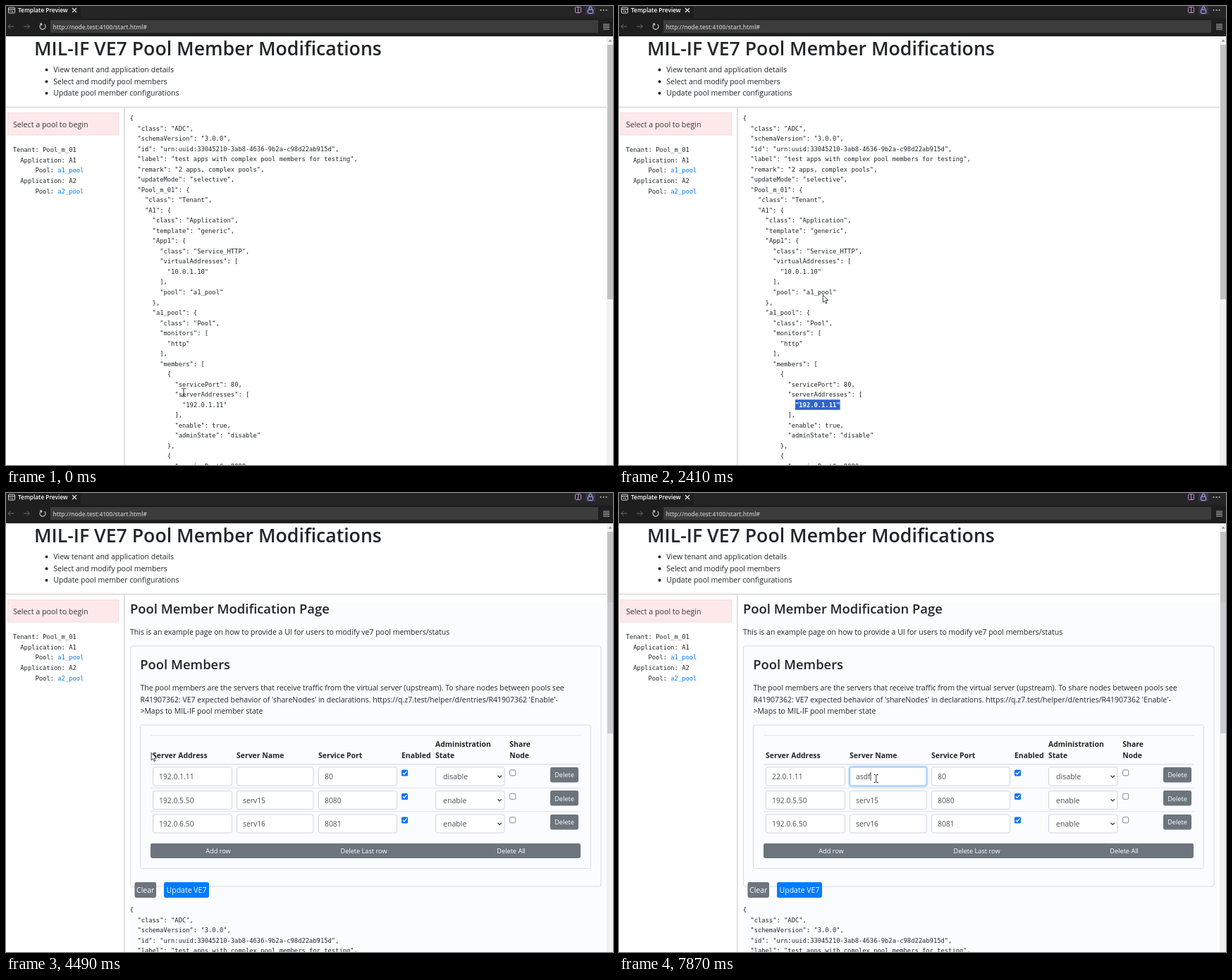
Write an HTML page that moves like this. It is 861x651 px and loops after 8000 ms.

```html
<!DOCTYPE html>
<html lang="en">
<head>
<meta charset="utf-8">
<title>Template Preview</title>
<style>
html, body { margin: 0; width: 100%; height: 100%; overflow: hidden; background: #fff; }
svg { display: block; width: 861px; height: 651px; overflow: hidden; }
text { font-family: "Open Sans", "Noto Sans", sans-serif; white-space: pre; }
text.mono { font-family: "DejaVu Sans Mono", "Liberation Mono", monospace; }
</style>
</head>
<body>
<svg id="stage" viewBox="0 0 861 651">
  <g id="shell"></g>
  <g id="viewer"></g>
  <g id="form"></g>
  <g id="live"></g>
</svg>
<script>
const LOOP = 8000, CHAR = 5.3, LINE = 14.53, FORM_AT = 3670;
const INK = '#212529', GREY = '#6c757d', FIELD = '#495057', BLUE = '#007bff', SELECT = '#3062cf';
const layer = id => document.getElementById(id);

// Drawing helpers, each returns SVG markup
const text = (x, y, s, size = 10.5, fill = INK, extra = '') =>
  `<text x="${x}" y="${y}" font-size="${size}" fill="${fill}" ${extra}>${s}</text>`;
const bold = (x, y, s, size = 10.45, weight = 700, fill = INK) =>
  text(x, y, s, size, fill, `font-weight="${weight}"`);
const mid = (x, y, s, size, fill) => text(x, y, s, size, fill, 'text-anchor="middle"');
const mono = (x, y, s, fill = INK, extra = '') => text(x, y, s, 8.8, fill, 'class="mono" ' + extra);
const rect = (x, y, w, h, fill, stroke = 'none', r = 0, sw = 1) =>
  `<rect x="${x}" y="${y}" width="${w}" height="${h}" rx="${r}" fill="${fill}" stroke="${stroke}" stroke-width="${sw}"/>`;
const path = (d, stroke, sw = 1, fill = 'none') =>
  `<path d="${d}" stroke="${stroke}" stroke-width="${sw}" fill="${fill}"/>`;

const config = {
  class: 'ADC',
  schemaVersion: '3.0.0',
  id: 'urn:uuid:33045210-3ab8-4636-9b2a-c98d22ab915d',
  label: 'test apps with complex pool members for testing',
  remark: '2 apps, complex pools',
  updateMode: 'selective',
  Pool_m_01: {
    class: 'Tenant',
    A1: {
      class: 'Application',
      template: 'generic',
      App1: { class: 'Service_HTTP', virtualAddresses: ['10.0.1.10'], pool: 'a1_pool' },
      a1_pool: {
        class: 'Pool',
        monitors: ['http'],
        members: [
          { servicePort: 80, serverAddresses: ['192.0.1.11'], enable: true, adminState: 'disable' },
          { servicePort: 8080, serverAddresses: ['192.0.5.50'] }
        ]
      }
    }
  }
};

const listing = top => JSON.stringify(config, null, 2).split('\n').map((line, i) => {
  const s = line.trimStart();
  return mono(175.8 + (line.length - s.length) * CHAR, top + i * LINE, s);
}).join('');

const scrollbar = bottom => rect(852, 43, 9, 608, '#f1f1f1') +
  rect(853, 55, 8, bottom - 55, '#c1c1c1') + path('M854.5 50.5l2.5-3 2.5 3z', 'none', 0, '#8a8a8a');

function drawShell() {
  const light = '#d4d4d4', dim = '#6b6b6b';
  let s = rect(0, 0, 861, 651, '#fff') + rect(0, 0, 861, 43, '#1e1e1e') +
    rect(106, 0, 755, 17, '#252526') + rect(63, 20, 777, 18, '#3c3c3c');
  s += rect(3.5, 2, 9, 8, 'none', light, 1) + path('M3.5 4.5h9M5 7h2.5M9 6v3', light);
  s += bold(17, 9.3, 'Template Preview', 8.3, 600, '#fff') + path('M94 3l6 6M100 3l-6 6', '#eee', 1.1);
  s += rect(807.5, 1.5, 8, 8, 'none', '#c58fd0', 1) + path('M811.5 1.5v8', '#c58fd0');
  s += rect(822, 0, 14, 12, '#34344a', 'none', 2) + rect(825.5, 5, 7, 5.5, 'none', '#b9b3ee', 1) +
    path('M827 5V3a2 2 0 0 1 4 0v2', '#b9b3ee');
  s += [843.5, 847.5, 851.5].map(x => rect(x - .8, 5, 1.6, 1.6, light)).join('');
  s += path('M11.5 29H3M6.5 25.5L3 29l3.5 3.5M25 29h8.5M30 25.5l3.5 3.5-3.5 3.5', dim);
  s += path('M54.6 26A4 4 0 1 1 50 25.7M48 25h2.6v2.7', light, 1.1);
  s += bold(66.5, 32.7, 'http://node.test:4100/start.html#', 8.3, 600, '#c4c4c4');
  s += path('M847 26h9M847 28.3h9M847 30.6h9M847 33h9', '#b5b5b5');

  s += bold(40, 70.3, 'MIL-IF VE7 Pool Member Modifications', 26.68, 600);
  ['View tenant and application details', 'Select and modify pool members', 'Update pool member configurations']
    .forEach((item, i) => {
      const y = 94 + i * 16.6;
      s += `<circle cx="57.5" cy="${y - 3.4}" r="2" fill="${INK}"/>` + text(67.3, y, item);
    });
  s += rect(0, 142.6, 852, 1.8, '#dcdcdc') + rect(167, 144, 1.8, 507, '#dcdcdc');
  s += rect(2.5, 151.5, 157, 31.5, '#fde9ea', '#f2dcde') + text(10, 171.8, 'Select a pool to begin', 10.7, '#3a3436');
  ['Tenant: Pool_m_01', '  Application: A1', '      Pool: ', '  Application: A2', '      Pool: ']
    .forEach((row, i) => {
      const label = row.trimStart();
      s += mono(9.7 + (row.length - label.length) * CHAR, 207.4 + i * LINE, label);
    });
  return s + mono(73.3, 265.5, 'a2_pool', BLUE);
}

const rows = [
  { y: 402, cells: ['', '', '80'], state: 'disable' },
  { y: 435.5, cells: ['192.0.5.50', 'serv15', '8080'], state: 'enable' },
  { y: 469, cells: ['192.0.6.50', 'serv16', '8081'], state: 'enable' }
];
const cols = [[208.5, 112], [327.5, 108.5], [443.5, 111]];
const value = (col, y, s, fill = FIELD) => text(cols[col][0] + 8.6, y + 4, s, 10.3, fill);
const box = (x, w, y, stroke = '#ced4da') => rect(x, y - 13, w, 26, '#fff', stroke, 2.8);
const button = (x, y, w, h, fill) => rect(x, y, w, h, fill, 'none', 2.4);

function drawForm() {
  const rule = '#dee2e6', card = '#d9dadc';
  let s = rect(176, 155, 676, 496, '#fbfcfe') + scrollbar(341) + rect(853, 155, 8, 186, '#cacbce');
  s += bold(176, 170.5, 'Pool Member Modification Page', 18.4, 600);
  s += text(176, 201.4, 'This is an example page on how to provide a UI for users to modify ve7 pool members/status');
  s += rect(176.5, 217, 667.5, 341, 'none', card, 3) + rect(190.5, 329, 639, 203.5, 'none', card, 3);
  s += bold(190.3, 250.3, 'Pool Members', 18.4, 600);
  ['The pool members are the servers that receive traffic from the virtual server (upstream). To share nodes between pools see',
   "R41907362: VE7 expected behavior of 'shareNodes' in declarations. https://q.z7.test/helper/d/entries/R41907362 'Enable'-",
   '&gt;Maps to MIL-IF pool member state'].forEach((line, i) => s += text(190.4, 280.2 + i * 16.6, line));
  s += path('M205 343.8H815.5M205 418.3H815.5M205 451.8H815.5', rule) + path('M205 384.7H815.5', rule, 1.6);
  [[208, 'Server Address'], [327, 'Server Name'], [443, 'Service Port'], [561, 'Enabled'], [609, 'State'], [714.3, 'Node']]
    .forEach(([x, name]) => s += bold(x, 376.4, name));
  s += bold(609, 359.8, 'Administration') + bold(714.3, 359.8, 'Share');

  for (const { y, cells, state } of rows) {
    cells.forEach((cell, i) => s += box(...cols[i], y) + value(i, y, cell));
    s += box(609.5, 97.5, y) + text(620, y + 4, state, 10.6, FIELD) +
      path(`M697.5 ${y - 1.3}l2.7 2.7 2.7-2.7`, '#343a40', 1.3);
    s += rect(561, y - 9.6, 9, 9, '#0075ff', 'none', 1.5) + path(`M562.8 ${y - 5}l2 2 3.6-4.3`, '#fff', 1.3);
    s += rect(714.7, y - 9.2, 8, 8, '#fff', '#767676', 1.5, .9);
    s += button(772, Math.floor(y - 13), 40, 21.5, GREY) + mid(792, y + 1.3, 'Delete', 9.2, '#fff');
  }
  s += button(205, 497, 610, 21, GREY);
  [[301, 'Add row'], [507.5, 'Delete Last row'], [716.6, 'Delete All']]
    .forEach(([x, name]) => s += mid(x, 511, name, 9.2, '#fff'));
  s += button(182.5, 552, 30.5, 22, GREY) + mid(197.7, 567.3, 'Clear', 10.5, '#fff');
  s += button(224, 552, 64, 22, BLUE) + mid(256, 567.3, 'Update VE7', 10.5, '#fff');
  return s + listing(594);
}

// Pointer moves: first step, last step, number of steps, end point
const moves = [
  [120, 240, 2, 252, 566], [650, 1070, 4, 322, 566], [1220, 1220, 1, 319, 566.5],
  [1530, 1530, 1, 315.5, 567.5], [1680, 1680, 1, 467.5, 577.5],
  [1990, 2950, 8, 111, 242], [3070, 3070, 1, 106.7, 234],
  [4100, 4610, 5, 231, 402], [4880, 5770, 7, 217, 402], [6453, 6877, 4, 350, 429],
  [7019, 7160, 2, 367, 414], [7330, 7460, 2, 364.7, 405]
];
function pointer(t) {
  let x = 252, y = 548;
  for (const [from, to, n, ex, ey] of moves) {
    if (t < from) break;
    const k = t >= to ? 1 : (Math.floor((t - from) / (to - from) * (n - 1)) + 1) / n;
    x += (ex - x) * k;
    y += (ey - y) * k;
  }
  return [x, y];
}

const ibeam = path('M-3.3-5.6h2.2l1.1 1 1.1-1h2.2M0-4.8V4.8M-3.3 5.6h2.2l1.1-1 1.1 1h2.2', '#2b2b2b', .95);
const arrow = path('M0 0V10.6L2.4 8.5 4 12.2 5.7 11.5 4.1 7.8H7.3Z', '#111', .8, '#fff');
const hand = path('M-1.3 9.5V.8a1.2 1.2 0 0 1 2.4 0V6c.6-1 2.2-.8 2.4.3.6-.9 2.1-.7 2.3.4.7-.7 1.7-.3 1.7.9V11' +
  'c0 3-1.6 4.4-4.1 4.4C.8 15.4 0 14-1 12.5L-3.8 9.2c-.9-1.2.6-2.4 1.6-1.5z', '#111', .9, '#fff');
const shape = t => t < 1220 || t >= 4610 ? ibeam : t >= 3070 && t < 4100 ? hand : arrow;

const focusRing = ([x, w], y) => rect(x - 1.4, y - 14.4, w + 2.8, 28.8, 'none', '#bfdeff', 3.6, 2) + box(x, w, y, '#80bdff');
const caret = (x, y) => rect(x, y - 6, .9, 12, '#222');

function jsonSelection(t, px) {
  if (t < 650) return '';
  const n = t < 1070 ? Math.max(0, Math.min(12, Math.round((px - 250) / CHAR))) : 12;
  const x = 175.8 + 14 * CHAR, y = 162 + 28 * LINE;
  return rect(x, y - 10.6, n * CHAR, 14.6, SELECT) +
    mono(x, y, '"192.0.1.11"'.slice(0, n), '#fff', 'font-weight="700"');
}

function fields(t, px) {
  const y = rows[0].y, digit = 5.88, left = cols[0][0] + 8.6;
  const address = t < 6170 ? '192.0.1.11' : t < 6311 ? '2.0.1.11' : '22.0.1.11';
  let s = '';
  if (t >= 4880 && t < 7330) s += focusRing(cols[0], y);
  s += value(0, y, address);
  if (t >= 4880 && t < 6170) {
    const start = px > 227 ? 2 : px > 219 ? 1 : 0;
    const x = left + start * digit;
    s += start === 2 ? caret(x, y) : rect(x, y - 7.5, (2 - start) * digit, 15, SELECT) +
      text(x, y + 4, '19'.slice(start), 10.3, '#fff');
  }
  if (t >= 6311 && t < 6811) s += caret(left + digit, y);
  if (t >= 7330) {
    const name = 'asdf'.slice(0, Math.floor((t - 7330) / 135));
    const ends = [0, 5.7, 10.6, 16.9, 20.4];
    s += focusRing(cols[1], y) + value(1, y, name) + caret(cols[1][0] + 8.6 + ends[name.length], y);
  }
  return s;
}

layer('shell').innerHTML = drawShell();
layer('viewer').innerHTML = scrollbar(416) + listing(162);
layer('form').innerHTML = drawForm();

function frame(now) {
  const t = now % LOOP, onForm = t >= FORM_AT, hover = t >= 3070 && t < 4100;
  const [x, y] = pointer(t);
  layer('viewer').style.display = onForm ? 'none' : '';
  layer('form').style.display = onForm ? '' : 'none';
  layer('live').innerHTML =
    mono(73.3, 236.4, 'a1_pool', hover ? '#0056b3' : BLUE, hover ? 'text-decoration="underline"' : '') +
    (onForm ? fields(t, x) : jsonSelection(t, x)) +
    `<g transform="translate(${x} ${y})">${shape(t)}</g>`;
  requestAnimationFrame(frame);
}
frame(0);
</script>
</body>
</html>
```
